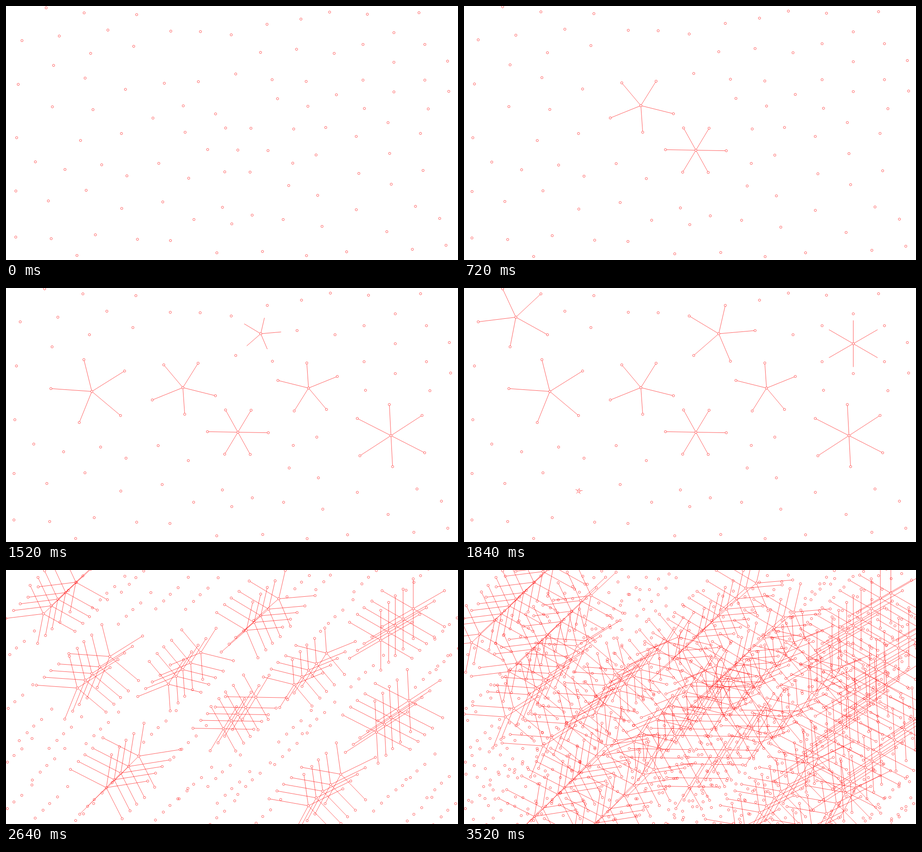
These frames come from a looping animation (998x561 px, 3840 ms). An HTML page with a canvas:

```html
<!DOCTYPE html>
<html lang="en">
<head>
<meta charset="utf-8">
<title>Constellations</title>
<style>
html, body { margin: 0; width: 100%; height: 100%; overflow: hidden; background: #fff; }
canvas { display: block; }
</style>
</head>
<body>
<canvas id="stage" width="998" height="561"></canvas>
<script>
const W = 998, H = 561, LOOP = 3840, TICK = 80;
const R = 2.5, GROW = 200, LONERS = 41;
const ctx = document.getElementById('stage').getContext('2d');

// Hub x, y, number of rays, direction of the first ray in degrees, mean reach.
const stars = [
  [390, 219.5, 5, -130, 67], [511.5, 318, 6, -119, 60], [189, 228, 5, -104, 81],
  [667.5, 220.5, 5, -94, 63], [849.5, 325.5, 6, -93, 78], [562, 100.5, 5, -77, 72],
  [114, 64, 5, -115, 75], [859, 122.5, 6, -90, 75], [253, 448, 5, -81, 83],
  [699, 488, 5, -98, 79]
].map(([x, y, rays, tilt, reach], i) => ({
  x, y,
  start: 298 + 222 * Math.min(i, 5) + 138 * Math.max(0, i - 5),
  tips: Array.from({ length: rays }, (_, k) => {
    const a = (tilt + k * 360 / rays) * Math.PI / 180;
    const len = reach * (1 + 0.12 * Math.cos(2 * a));
    return { x: x + len * Math.cos(a), y: y + len * Math.sin(a) };
  })
}));

// Shifts of the copies, stepping outwards to both sides in turn.
const copies = [
  [-14.6, 14.7], [17.3, -14.6], [-32, 32.2], [39.7, -37.5], [-46.8, 46.7],
  [59.8, -61], [-80, 77], [83, -72], [-98, 96]
];
const echo = { at: 3440, dx: 83, dy: 64 };
const copyTime = i => 2160 + 160 * i - 80 * Math.min(2, Math.max(0, i - 3));

let seed = 7;
function random() {
  seed = (seed * 16807) % 2147483647;
  return seed / 2147483647;
}

// Fills the gaps: each new dot is the most remote of several candidates.
const dots = stars.flatMap(s => [s, ...s.tips]);
const gap = p => Math.min(...dots.map(d => Math.hypot(d.x - p.x, d.y - p.y)));
for (let i = 0; i < LONERS; i++) {
  let best = null, widest = -1;
  for (let k = 0; k < 40; k++) {
    const p = { x: 17 + 965 * random(), y: 10 + 545 * random() };
    const g = gap(p);
    if (g > widest) [best, widest] = [p, g];
  }
  dots.push(best);
}

const clamp = v => Math.min(1, Math.max(0, v));

function ray(a, b, grown) {
  const len = Math.hypot(b.x - a.x, b.y - a.y);
  const ux = (b.x - a.x) / len, uy = (b.y - a.y) / len;
  const end = Math.min(len * grown, len - R);
  if (end <= R) return;
  ctx.moveTo(a.x + ux * R, a.y + uy * R);
  ctx.lineTo(a.x + ux * end, a.y + uy * end);
}

function drawing(t, dx, dy) {
  const zoom = 0.9917 + 0.0083 * clamp(t / 560);
  const place = p => ({
    x: W / 2 + (p.x - W / 2) * zoom + dx + 0.5,
    y: H / 2 + (p.y - H / 2) * zoom + dy + 0.5
  });
  ctx.beginPath();
  for (const p of dots.map(place)) {
    ctx.moveTo(p.x + R, p.y);
    ctx.arc(p.x, p.y, R, 0, Math.PI * 2);
  }
  for (const star of stars) {
    const grown = clamp((t - star.start) / GROW);
    for (const tip of star.tips) ray(place(star), place(tip), grown);
  }
  ctx.stroke();
}

// A quick flicker at first, longer spells later, white at the end.
function isPurple(tick) {
  if (tick < 25) return tick > 0 && tick % 2 === 0;
  return tick < 43 && (tick - 25) % 10 < 4;
}

function render(t) {
  ctx.fillStyle = isPurple(t / TICK) ? '#cc66ff' : '#fff';
  ctx.fillRect(0, 0, W, H);
  ctx.strokeStyle = '#ff0000';
  ctx.lineWidth = 0.65;
  drawing(t, 0, 0);
  copies.forEach(([dx, dy], i) => {
    if (t < copyTime(i)) return;
    drawing(t, dx, dy);
    if (t >= echo.at) drawing(t, dx + echo.dx, dy + echo.dy);
  });
}

const begin = performance.now();
let last = -1;
function loop() {
  const now = (performance.now() - begin) % LOOP;
  const t = Math.floor(now / TICK) * TICK;
  if (t !== last) render(last = t);
  requestAnimationFrame(loop);
}
loop();
</script>
</body>
</html>
```
